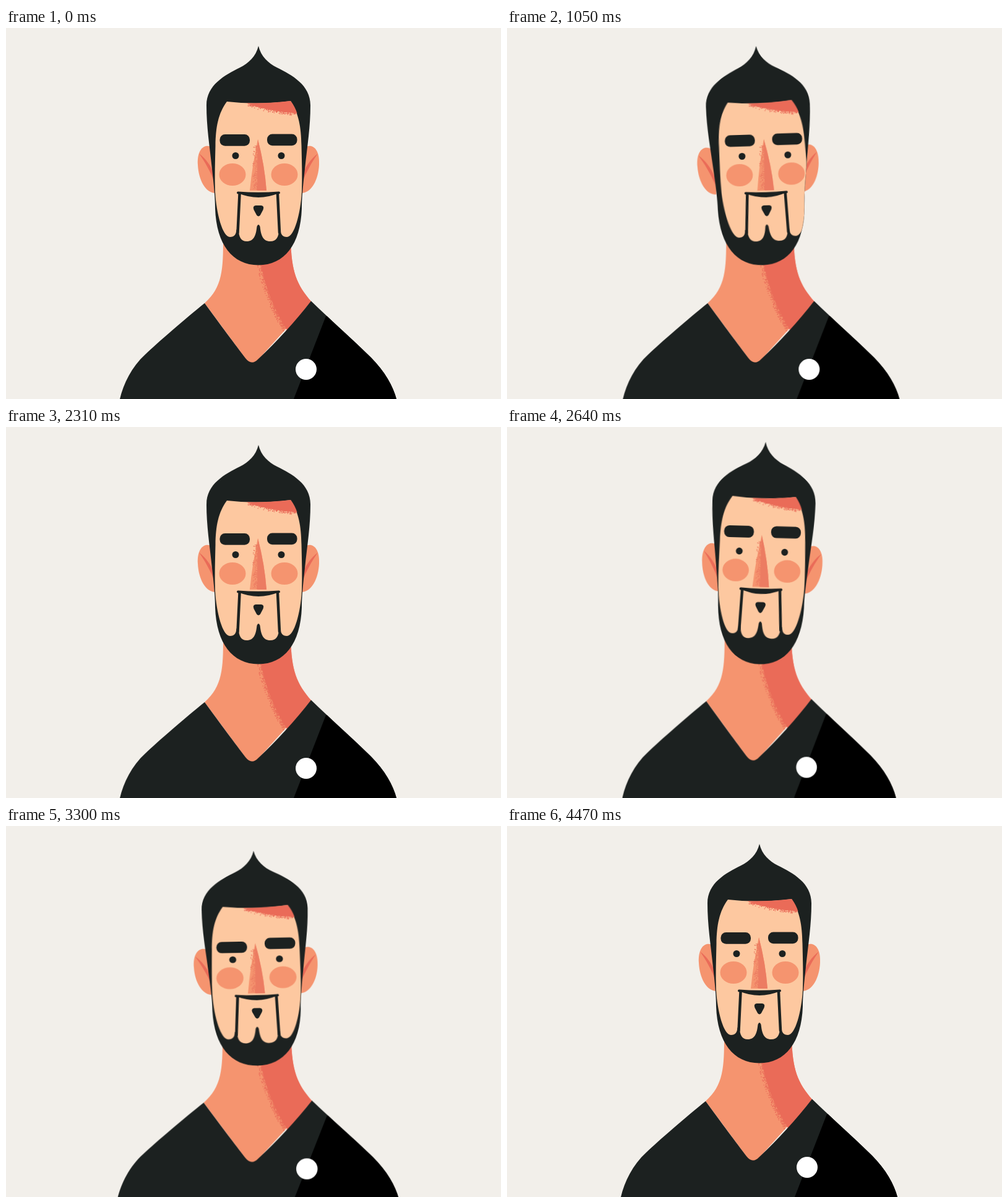
An HTML page for the animation above (4.5 s loop, 800 by 600 pixels).

```html
<!DOCTYPE html>
<html lang="en">
<head>
<meta charset="utf-8">
<title>Portrait</title>
<style>
  html, body { margin: 0; width: 100%; height: 100%; overflow: hidden; background: #f2efea; }
  svg { display: block; width: 800px; height: 600px; }

  .ink { fill: #1c2120; }
  .skin { fill: #fdc8a0; }
  .tan { fill: #f5946f; }
  .red { fill: #ea6b58; }
  .shade { fill: #ec7c62; }
  .line { fill: none; stroke: #1c2120; stroke-linecap: round; }

  .body, .head, .ears, .mask, .face, .brows, .brow, .eye, .lid {
    animation: 4.5s ease-in-out infinite;
  }
  .body { animation-name: body; transform-origin: 408px 540px; }
  .head { animation-name: head; transform-origin: 408px 383px; }
  .ears { animation-name: ears; }
  .mask { animation-name: mask; transform-origin: 408px 119px; }
  .face { animation-name: face; }
  .brows { animation-name: brows; }
  .brow { animation-name: brow; }
  .eye { animation-name: eye; transform-origin: 408px 207px; }
  .lid { animation-name: lid; animation-timing-function: step-end; opacity: 0; }

  /* Turn to the side and back, then nod up, down and back */
  @keyframes body {
    0%, 41%, 51%, 88%, 100% { transform: translate(0, 0) scaleX(1); }
    12.2% { transform: translate(3.3px, 0) scaleX(1); }
    26% { transform: translate(3.3px, 0) scaleX(1); animation-timing-function: ease-in; }
    34.67% { transform: translate(2px, 0) scaleX(1); animation-timing-function: ease-out; }
    58.67%, 61% { transform: translate(0, -1.6px) scaleX(.988); }
    72%, 75% { transform: translate(0, 2.5px) scaleX(1.017); }
  }
  @keyframes head {
    0%, 41%, 51%, 88%, 100% { transform: translate(0, 0) rotate(0deg) scale(1, 1); }
    12.2% { transform: translate(5.6px, 0) rotate(-1.8deg) scale(1, 1); }
    26% { transform: translate(5.6px, 0) rotate(-1.8deg) scale(1, 1); animation-timing-function: ease-in; }
    34.67% { transform: translate(2.8px, 0) rotate(-1.56deg) scale(1, 1); animation-timing-function: ease-out; }
    58.67%, 61% { transform: translate(0, 0) rotate(1.6deg) scale(.992, 1.014); }
    72%, 75% { transform: translate(-1.3px, 4px) rotate(-1.1deg) scale(1.02, .98); }
  }
  @keyframes ears {
    0%, 41%, 51%, 88%, 100% { transform: translate(0, 0); }
    12.2% { transform: translate(-2.8px, 0); }
    26% { transform: translate(-2.8px, 0); animation-timing-function: ease-in; }
    34.67% { transform: translate(-1.5px, 0); animation-timing-function: ease-out; }
    58.67%, 61% { transform: translate(0, 2px); }
    72%, 75% { transform: translate(0, -1.6px); }
  }
  @keyframes mask {
    0%, 41%, 51%, 88%, 100% { transform: translate(0, 0) skewX(0deg); }
    12.2% { transform: translate(2.5px, 0) skewX(1.7deg); }
    26% { transform: translate(2.5px, 0) skewX(1.7deg); animation-timing-function: ease-in; }
    34.67% { transform: translate(1.5px, 0) skewX(1.15deg); animation-timing-function: ease-out; }
    58.67%, 61% { transform: translate(-.5px, -2.6px) skewX(0deg); }
    72%, 75% { transform: translate(.5px, 1.5px) skewX(0deg); }
  }
  @keyframes face {
    0%, 41%, 51%, 88%, 100% { transform: translate(0, 0); }
    12.2% { transform: translate(8.8px, 0); }
    26% { transform: translate(8.8px, 0); animation-timing-function: ease-in; }
    34.67% { transform: translate(5.8px, 0); animation-timing-function: ease-out; }
    58.67%, 61% { transform: translate(-1px, -2.5px); }
    72%, 75% { transform: translate(.8px, 1.5px); }
  }
  @keyframes brows {
    0%, 41%, 51%, 72%, 100% { transform: translate(0, 0); }
    12.2%, 26% { transform: translate(-1.5px, 0); }
    58.67%, 61% { transform: translate(0, -6px); }
  }
  @keyframes brow {
    0%, 61%, 88%, 100% { transform: translateY(0); }
    72%, 75% { transform: translateY(4.8px); }
  }
  @keyframes eye {
    0%, 32%, 38%, 100% { transform: scaleY(1); opacity: 1; }
    33.4% { transform: scaleY(.35); opacity: 1; }
    33.41%, 36.5% { transform: scaleY(.35); opacity: 0; }
    36.51% { transform: scaleY(.35); opacity: 1; }
  }
  @keyframes lid {
    0%, 36.5%, 100% { opacity: 0; }
    33.4% { opacity: 1; }
  }
</style>
</head>
<body>
<svg viewBox="0 0 800 600">
  <defs>
    <path id="shirt" d="M321 445C345 478 372 514 387 534Q397 547 408 535C437 508 468 474 493 441.500
      C518 466 566 509 590 533C612 555 626 580 631 600L634 625H180L184 600C190 575 203 548 225 528C245 509 290 470 321 445Z"/>
    <path id="skull" d="M408 29C412 46 424 57 438 64C462 76 492 92 492 125C492 160 487 190 483 228C480 255 478 275 478 292
      C476 350 450 383.500 408 383.500C366 383.500 340 350 338 292C338 275 336 255 333 228C329 190 324 160 324 125
      C324 92 354 76 378 64C392 57 404 46 408 29Z"/>
    <g id="ear">
      <path class="tan" d="M345 205C338 193 329 190 323 191C314 193 309 205 310 221C311 245 322 267 339 267Z"/>
      <path class="red" d="M312 203C323 211 332 224 338 240V251C331 234 322 217 312 203Z"/>
    </g>
    <clipPath id="inShirt"><use href="#shirt"/></clipPath>
    <clipPath id="inSkull"><use href="#skull"/></clipPath>
  </defs>

  <rect width="800" height="600" fill="#f2efea"/>

  <g class="body">
    <path class="tan" d="M351 340C351 390 350 419 321 445L397 548L493 442C470 415 461 395 460 340Z"/>
    <path class="red" d="M411 340L412 383Q423 440 455 490L493 442C470 415 461 395 460 340Z"/>
    <path class="red" id="neckGrain"/>
    <use class="ink" href="#shirt"/>
    <path clip-path="url(#inShirt)" d="M517 466L465 600V630H660V440Z"/>
    <circle cx="485" cy="552" r="17" fill="#fff"/>
  </g>

  <g class="head">
    <g class="ears">
      <use href="#ear"/>
      <use href="#ear" transform="matrix(-1 0 0 1 816 0)"/>
    </g>
    <use class="ink" href="#skull"/>
    <g clip-path="url(#inSkull)">
      <g class="mask">
        <path class="skin" d="M357 119Q408 125 460 118C473 138 477 160 477.500 190C478 215 479 240 478 265
          C476 300 466 338 454 338C447 338 444 334 443.500 326H441C441 338 437 345 427 345C415 345 412 335 410.500 321
          Q408 315 405.500 321C404 335 401 345 389 345C380 345 376 338 376 326H372.500C372 334 369 338 362 338
          C350 338 340 300 338 265C337 240 338 215 338.500 190C339 160 343 138 357 119Z"/>
        <path class="red" d="M388 121.500Q425 122 460 118Q467 127 470.500 138Q425 135 388 121.500Z"/>
        <path class="red" id="browGrain"/>
      </g>
    </g>
    <g class="face">
      <path class="tan" d="M407 180Q418 222 421 263H394Q398 222 407 180Z"/>
      <path class="shade" d="M407 180Q418 222 421 263H406Q406 222 407 180Z"/>
      <path class="shade" id="noseGrain"/>
      <ellipse class="tan" cx="366" cy="237" rx="21.500" ry="18"/>
      <ellipse class="tan" cx="450" cy="237" rx="21.500" ry="18"/>
      <g class="brows ink">
        <rect class="brow" x="345.500" y="172" width="48.500" height="18.700" rx="8.500"/>
        <rect x="422" y="171.500" width="48.500" height="18.700" rx="8.500"/>
      </g>
      <g class="eye ink">
        <circle cx="371" cy="206.500" r="5.500"/>
        <circle cx="445" cy="206.500" r="5.500"/>
      </g>
      <path class="lid line" stroke-width="4" d="M364 209Q371 206 377 209M438 209Q445 206 451 209"/>
      <path class="line" stroke-width="4.500" d="M377.500 269L374.500 331M439 269L442 331"/>
      <path class="line" stroke-width="4" d="M375 266.500Q408 269 441 266.500"/>
      <path class="ink" d="M375 267Q408 281 441 267Z"/>
      <path class="ink" d="M403.500 287H412.500Q418 288 415.500 294L411 302.500Q408 306.500 405 302.500L400.500 294Q398 288 403.500 287Z"/>
    </g>
  </g>
</svg>
<script>
  let seed = 7;
  const rand = () => (seed = seed * 16807 % 2147483647) / 2147483647;

  // Speckles along a quadratic curve, thinning out in direction (dx, dy)
  function grain(id, [x0, y0, cx, cy, x1, y1], dx, dy, count) {
    let d = '';
    for (let i = 0; i < count; i++) {
      const t = rand(), u = 1 - t, fall = rand() ** 2;
      const x = u * u * x0 + 2 * u * t * cx + t * t * x1 + dx * fall;
      const y = u * u * y0 + 2 * u * t * cy + t * t * y1 + dy * fall;
      d += `M${x.toFixed(1)} ${y.toFixed(1)}h1.3v1.3h-1.3z`;
    }
    document.getElementById(id).setAttribute('d', d);
  }

  grain('neckGrain', [411, 383, 422, 440, 454, 489], -6, 1, 260);
  grain('browGrain', [391, 122, 427, 134, 468, 137], -2, 4, 130);
  grain('noseGrain', [406, 190, 405, 224, 405, 262], -7, 0, 150);
</script>
</body>
</html>
```
